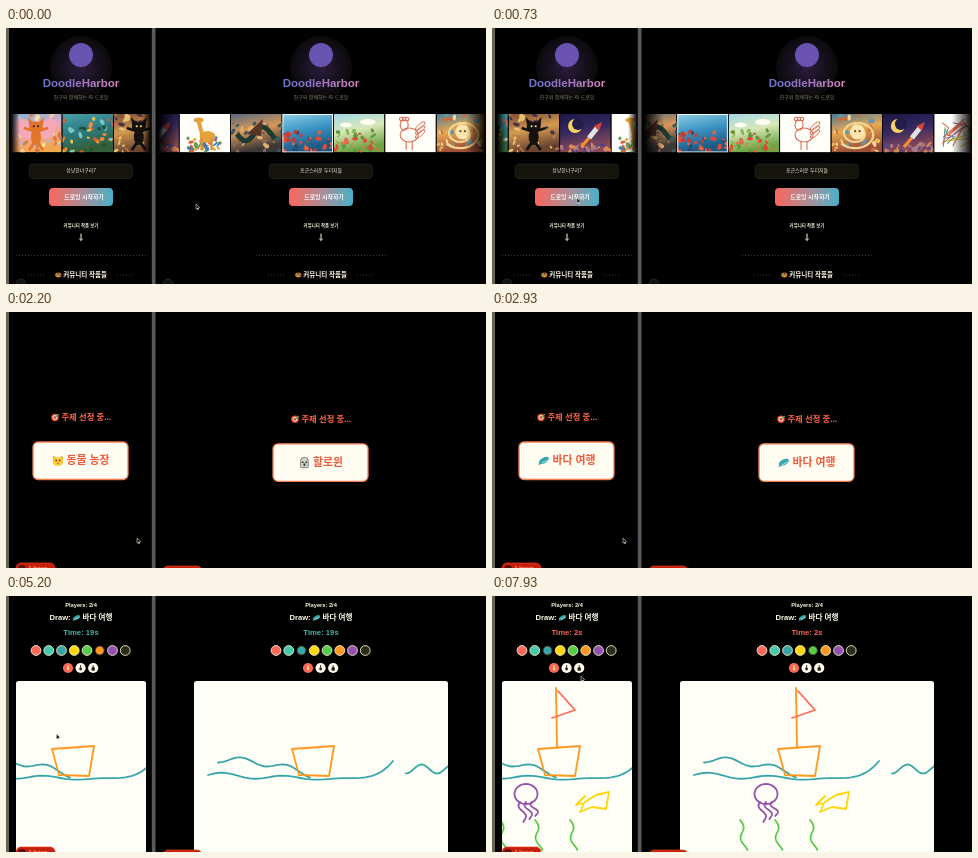
An HTML page with a canvas for the animation above (8000 ms loop, 480x256 px).

```html
<!DOCTYPE html>
<html lang="ko">
<head>
<meta charset="utf-8">
<title>DoodleHarbor</title>
<style>
  html, body { margin: 0; width: 100%; height: 100%; overflow: hidden; background: #000; }
  canvas { display: block; width: 100vw; height: 100vh; }
</style>
</head>
<body>
<canvas id="stage"></canvas>
<script>
const LOOP = 8000, STEP = 1000 / 15, W = 480, H = 256;
const JOIN = [800, 1470], PICK = 2030, SETTLE = 2930, GAME = 3345;
const NAMES = ['상냥한너구리7', '포근스러운 두더지들'];
const [RED, MINT, TEAL, YELLOW, GREEN, ORANGE, PURPLE, DARK] = [0, 1, 2, 3, 4, 5, 6, 7];
const PALETTE = ['#ff6b58', '#48c9a9', '#38a6a8', '#ffd60a', '#58cc48', '#ff981f', '#9350ad', '#2b2d16'];
const TOPICS = [['cat', '동물 농장'], ['ghost', '할로윈'], ['dolphin', '바다 여행']];
const PANELS = [{ id: 0, x: 4, w: 141, dx: 0 }, { id: 1, x: 150, w: 330, dx: 240 }];
const FONT = '"Liberation Sans", "Noto Sans CJK KR", "Noto Sans CJK", sans-serif';
const { sin, cos, PI } = Math;

const canvas = document.getElementById('stage');
const c = canvas.getContext('2d');

// ---- drawing helpers ----
function shape(fill, stroke, width = 1) {
  if (fill) { c.fillStyle = fill; c.fill(); }
  if (stroke) { c.strokeStyle = stroke; c.lineWidth = width; c.stroke(); }
}
function rect(x, y, w, h, fill) { c.fillStyle = fill; c.fillRect(x, y, w, h); }
function round(x, y, w, h, r, fill, stroke, width) {
  c.beginPath(); c.roundRect(x, y, w, h, r); shape(fill, stroke, width);
}
function oval(x, y, rx, ry, fill, stroke, width, turn = 0) {
  c.beginPath(); c.ellipse(x, y, rx, ry, turn, 0, 7); shape(fill, stroke, width);
}
function dot(x, y, r, fill, stroke, width) { oval(x, y, r, r, fill, stroke, width); }
function poly(points, fill, stroke, width) {
  c.beginPath();
  points.forEach(([x, y]) => c.lineTo(x, y));
  if (fill) c.closePath();
  shape(fill, stroke, width);
}
function line(x0, y0, x1, y1, color, width) { poly([[x0, y0], [x1, y1]], null, color, width); }
function dashed(x0, x1, y, color) {
  c.setLineDash([1, 2]); line(x0, y, x1, y, color, 0.8); c.setLineDash([]);
}
function blend(x0, y0, x1, y1, ...colors) {
  const g = c.createLinearGradient(x0, y0, x1, y1);
  colors.forEach((color, i) => g.addColorStop(i / (colors.length - 1), color));
  return g;
}
function glow(x, y, r, ...colors) {
  const g = c.createRadialGradient(x, y, 0, x, y, r);
  colors.forEach((color, i) => g.addColorStop(i / (colors.length - 1), color));
  dot(x, y, r, g);
}
function text(s, x, y, size, color, weight = 400, align = 'center') {
  c.font = `${weight} ${size}px ${FONT}`;
  c.textAlign = align; c.textBaseline = 'middle'; c.fillStyle = color;
  c.fillText(s, x, y);
}
function moved(x, y, scale, draw) {
  c.save(); c.translate(x, y); c.scale(scale, scale); draw(); c.restore();
}
function sample(fn, n = 40) { return Array.from({ length: n + 1 }, (_, i) => fn(i / n)); }
function random(seed) {
  return () => {
    seed = (seed * 16807) % 2147483647;
    return seed / 2147483647;
  };
}

// ---- icons in a 10 x 10 box around the origin ----
function eyes(color) { dot(-1.6, -0.6, 0.8, color); dot(1.6, -0.6, 0.8, color); }
const ICONS = {
  target() {
    ['#e8452c', '#f6d9c8', '#d8321f'].forEach((color, i) => dot(0, 0, 4.5 - i * 1.5, color));
    line(0, 0, 4.5, -4, '#48b070', 1.6);
  },
  cat() {
    for (const side of [-1, 1]) poly([[side * 4.5, -5], [side, -3], [side * 4.5, 0]], '#f2b62a');
    oval(0, 0.5, 4.8, 4, '#ffc93a'); eyes('#4a3510'); dot(0, 2, 0.8, '#d96b50');
  },
  ghost() {
    round(-3.5, -5, 7, 9.5, [4, 4, 1, 1], '#d5d7ce', '#6d7068', 0.8);
    eyes('#30332e'); oval(0, 1.8, 1, 1.3, '#30332e');
  },
  dolphin() {
    oval(0, -0.5, 5, 2.6, '#36a8b0', null, 0, -0.5);
    poly([[-4, 0], [-5, 4], [-1, 2]], '#36a8b0'); line(-2, 2, 4, -1, '#b8ecdf', 0.8);
  },
  palette() {
    oval(0, 0, 4.8, 3.8, '#c77a35');
    ['#ee4b36', '#f5d13c', '#4fb06a', '#301a08'].forEach((color, i) => dot(2.4 * cos(i * 1.6), 2 * sin(i * 1.6), 1, color));
  }
};
function iconText(before, kind, after, x, y, size, color) {
  c.font = `700 ${size}px ${FONT}`;
  const gap = size * 0.28, pre = c.measureText(before).width, post = c.measureText(after).width;
  const start = x - (pre + size + gap + post) / 2;
  text(before, start, y, size, color, 700, 'left');
  moved(start + pre + size / 2, y, size / 10, ICONS[kind]);
  text(after, start + pre + size + gap, y, size, color, 700, 'left');
}

// ---- gallery cards: a sky, seeded dabs below a height, one subject ----
const CARD_W = 50.6, CARD_H = 38.5, PITCH = 51.4;
const creature = (body, wing, eye) => () => {
  for (const side of [-1, 1]) {
    if (wing) oval(25 + side * 12, 15, 7, 11, wing, null, 0, side * 0.5);
    poly([[25 + side * 8, 3], [25 + side, 10], [25 + side * 6, 15]], body);
    line(25, 18, 25 + side * 12, 14, body, 2.4);
    line(25, 26, 25 + side * 7, 36, body, 3);
  }
  oval(25, 23, 5, 8, body); oval(25, 13, 7, 5.5, body);
  moved(25, 13, 1.3, () => eyes(eye));
};
const rocket = {
  sky: ['#1c1846', '#35295f', '#8a4a58'], dabs: ['#a8798a', '#5a4478', '#d98a50'], top: 30,
  subject() {
    dot(15, 12, 7, '#f6d264'); dot(18, 10, 6, '#231d4c');
    line(21, 33, 29, 24, '#ff8a2c', 3); line(29, 24, 37, 14, '#dfe3e6', 5);
    poly([[34, 12], [42, 8], [39, 17]], '#d84535');
  }
};
const CARDS = [
  { sky: ['#7fb4dc', '#eea6b4', '#f0a850'], dabs: ['#f6c9a0', '#d87a50', '#a7b8e8', '#f4e0a0'], top: 0,
    subject: creature('#e2752a', '#f4a8b8', '#2c1808') },
  { sky: ['#4aa0a8', '#2c7c84', '#345f38'], dabs: ['#ed8a32', '#e9c64b', '#7cc4c0', '#244c34', '#d65b36'], top: 4 },
  { sky: ['#7c4c34', '#d29a50', '#6a4430'], dabs: ['#4a3048', '#b87a40', '#e8c070'], top: 0,
    subject: creature('#15110f', null, '#f5e27a') },
  rocket,
  { sky: ['#fffef8', '#fffef8'], dabs: ['#397fb3', '#e26043', '#6b9f55', '#e8a83a'], top: 24, inset: 8,
    subject() {
      line(19, 7, 24, 26, '#e4a13d', 4); oval(19, 6, 5, 2.6, '#e4a13d'); oval(28, 23, 8, 6, '#e4a13d');
      for (const x of [22, 32]) line(x, 24, x, 36, '#d4903a', 2.4);
    } },
  { sky: ['#586a80', '#d89858', '#3c3838'], dabs: ['#8a6a58', '#3c5a58', '#e0b070'], top: 8,
    subject() {
      poly(sample(u => [6 + 38 * u, 20 + 7 * sin(u * 7)]), null, '#1f3a30', 5);
      poly([[16, 20], [32, 5], [30, 22]], '#5a3428');
    } },
  { sky: ['#8fd0e8', '#3c94c4', '#1c5884'], dabs: ['#dd4b35', '#e8603b', '#28486c', '#c83b30'], top: 17, edge: '#f4f8f4' },
  { sky: ['#a4d8e8', '#d8e8b8', '#6fa344'], dabs: ['#dc4935', '#5d943d', '#8ab858', '#e86a4c'], top: 16,
    subject() { oval(34, 8, 8, 3, '#fffdf0'); oval(12, 11, 6, 2.4, '#fffdf0'); } },
  { sky: ['#fffef8', '#fffef8'], dabs: [], top: 0,
    subject() {
      const ink = '#dc6c58';
      oval(24, 21, 9, 7, null, ink, 1.1); oval(19, 11, 4, 5, null, ink, 1.1);
      for (let i = 0; i < 3; i++) {
        dot(16 + i * 3, 5, 1.7, null, ink, 1.1);
        oval(35, 12 + i * 4, 6, 2, null, ink, 1, -0.7);
      }
      for (const x of [21, 27]) line(x, 28, x, 36, ink, 1.1);
    } },
  { sky: ['#4c7c9c', '#e8a850', '#9c5038'], dabs: ['#f4d8a0', '#c86c38', '#6898a8', '#f0b858'], top: 0,
    subject() {
      poly(sample(u => [25 + 20 * u * cos(u * 15), 20 + 15 * u * sin(u * 15)], 60), null, '#f6d490', 2.2);
      dot(26, 18, 7.5, '#ffe6ac'); moved(26, 18, 1.4, () => eyes('#704325'));
    } },
  rocket,
  { sky: ['#fffef8', '#fffef8'], dabs: [], top: 0,
    subject() {
      const next = random(77);
      for (const color of ['#d8634c', '#e3bd3a', '#559d94', '#9865a2', '#d8634c']) {
        poly(sample(() => [8 + next() * 34, 5 + next() * 28], 4), null, color, 1.1);
      }
    } }
];
function paintCard({ sky, dabs, top, subject, inset = 0, edge }, seed) {
  const next = random(seed * 991 + 7);
  rect(0, 0, CARD_W, CARD_H, blend(0, 0, 8, CARD_H, ...sky));
  for (let i = 0; dabs.length && i < 34; i++) {
    const x = inset + next() * (CARD_W - 2 * inset), y = top + next() * (CARD_H - top);
    oval(x, y, 1 + next() * 2.6, 0.8 + next() * 1.6, dabs[i % dabs.length], null, 0, next() * 3);
  }
  if (subject) subject();
  if (edge) { c.strokeStyle = edge; c.lineWidth = 2; c.strokeRect(0, 0, CARD_W, CARD_H); }
}
function gallery(p, t) {
  const y = 86, span = PITCH * CARDS.length, start = p.id ? -32 : 5;
  const x0 = p.id ? 152 : 5, x1 = p.id ? 480 : 145, fade = p.id ? 20 : 9;
  c.save();
  c.beginPath(); c.rect(x0, y, x1 - x0, CARD_H); c.clip();
  CARDS.forEach((card, i) => {
    let x = start + i * PITCH - t * 0.1243;
    if (x < x0 - PITCH) x += span;
    if (x > x1) return;
    c.save(); c.translate(x, y);
    c.beginPath(); c.rect(0, 0, CARD_W, CARD_H); c.clip();
    paintCard(card, i + 1); c.restore();
  });
  rect(x0, y, fade, CARD_H, blend(x0, 0, x0 + fade, 0, '#000', '#0000'));
  rect(x1 - fade, y, fade, CARD_H, blend(x1 - fade, 0, x1, 0, '#0000', '#000'));
  c.restore();
}

// ---- screens ----
function gradientButton(y, label) {
  round(43, y, 64, 18, 4, blend(43, 0, 107, 0, '#fa665c', '#b08c94', '#48b0c8'));
  text(label, 78, y + 9, 5.9, '#fff', 700);
}
function home(p, t) {
  gallery(p, t);
  c.save(); c.translate(p.dx, 0);
  glow(75, 39, 31, '#2a1c40', '#191322', '#0b090c');
  dot(75, 27, 12, '#6953b0');
  text('DoodleHarbor', 75, 56, 11.5, blend(36, 0, 113, 0, '#6674d4', '#9a74c4', '#dc86c0'), 700);
  text('친구와 함께하는 AI 드로잉', 75, 70, 5, '#85836c');
  round(23, 136, 103.5, 14.5, 4, '#14130c', '#29271a', 0.7);
  text(NAMES[p.id], 75, 143, 4.9, '#f5f2de');
  gradientButton(160, '드로잉 시작하기');
  text('커뮤니티 작품 보기', 75, 198, 4.4, '#f4f1d5', 700);
  line(75, 205.5, 75, 212.5, '#f4f1d5', 1);
  poly([[73.2, 210.5], [75, 212.5], [76.8, 210.5]], null, '#f4f1d5', 0.9);
  dashed(10, 141, 227.5, '#4a4834');
  dashed(22, 39, 247, '#4a4834'); dashed(111, 128, 247, '#4a4834');
  iconText('', 'palette', '커뮤니티 작품들', 75, 247, 6.5, '#fffbe8');
  c.restore();
}
function seat(x, y, name) {
  if (!name) {
    dot(x, y, 18.5, '#0d0c05', '#3f3b1e', 0.9);
    for (const side of [-1, 1]) poly([[x - 3, y - 6 + side * 4], [x + 3, y - 6 + side * 4], [x, y - 6]], '#665b25');
    text('대기 중', x, y + 6, 4, '#59532c');
    return;
  }
  glow(x, y, 23, '#5a210f', '#5a210f', '#0000');
  dot(x, y, 18.5, '#260d08', '#f45a48', 1.3);
  dot(x, y - 7, 9, '#f9605a');
  moved(x, y - 7, 1.4, () => eyes('#ffe9d8'));
  poly(sample(u => [x - 3 + 6 * u, y - 5 + 1.6 * sin(PI * u)]), null, '#ffe9d8', 0.8);
  text(name, x, y + 9.5, 3.7, '#fff', 700);
  dot(x + 11.5, y - 12, 4, '#42b84a');
  poly([[x + 9.7, y - 12], [x + 11, y - 10.6], [x + 13.5, y - 13.4]], null, '#eaffda', 0.8);
}
function lobby(p, t) {
  const full = t >= JOIN[1];
  c.save(); c.translate(p.dx, 0);
  for (let i = 0; i < 4; i++) {
    seat(52 + 45.5 * (i % 2), 97 + 46 * (i >> 1), i === 0 || full ? NAMES[i] : '');
  }
  if (!full) {
    round(33, 172, 83.5, 13.5, 3, '#1d1a0b', '#2d2810', 0.6);
    text('1명 더 필요해요, 친구들을 초대해보세요!', 75, 178.5, 4.2, '#e9dfaa');
  }
  dashed(10, 141, 239.5, '#302e20');
  gradientButton(246.5, '초대하기');
  c.restore();
}
function topicPicker(p, t, frame) {
  const [kind, label] = TOPICS[t >= SETTLE ? 2 : (frame + p.id) % 3];
  c.save(); c.translate(p.dx, p.id * 1.8);
  iconText('', 'target', '주제 선정 중...', 75, 105.5, 8.3, '#ff6540');
  round(27, 130, 95, 37.5, 5, '#fffdf2', '#f47a4e', 1.3);
  iconText('', kind, label, 75, 149, 10.9, '#f0593c');
  c.restore();
}

// ---- shared drawing, in left panel coordinates ----
const waves = [
  sample(u => [-28 + 92 * u, 163.5 + 15 * u * u + 3 * cos(4 * PI * u)]),
  sample(u => [-38 + 185 * u, 179 - 3 * (1 - u) * sin(6 * PI * u) + 6 * u - 20 * u ** 12]),
  sample(u => [160 + 42 * u, 173 + 4.5 * cos(8.5 * u)])
];
const hull = [[46, 153], [53, 179], [83, 180], [88, 150], [46, 153]];
const mast = [[64, 92], [65, 152]];
const sail = [[66, 95], [83, 114], [60, 122]];
const weeds = [0, 1, 2].map(i => sample(u => [8 + 35 * i + 5 * u + 2.5 * sin(7.5 * u), 224 + 30 * u]));
const fish = [[93, 200], [84, 209], [92, 207], [88, 216], [100, 211], [114, 213], [117, 196], [104, 199], [93, 206]];
const octopus = [
  sample(u => [34 - 11.5 * cos(2 * PI * u), 198 - 10 * sin(2 * PI * u)]),
  ...[0, 1, 2].map(i => sample(u => [28 + 6 * i + 5 * u - 2.5 * sin(7 * u), 206 + (20 - 3 * i) * u]))
];
const SESSIONS = [
  [1, TEAL, 3800, 4780, waves],
  [0, ORANGE, 5030, 5400, [hull, mast]],
  [0, RED, 5560, 5700, [sail]],
  [1, GREEN, 5920, 6250, weeds],
  [0, YELLOW, 6470, 6950, [fish]],
  [0, PURPLE, 7160, 7700, octopus]
];
const picks = [[0, RED, 0], [1, RED, 0], ...SESSIONS.map(([author, swatch, from]) => [author, swatch, from - 90]), [0, TEAL, 7830]];
const strokes = SESSIONS.flatMap(([author, swatch, from, to, paths]) => {
  const slot = (to - from) / paths.length, gap = paths.length > 1 ? 0.12 : 0;
  return paths.map((points, i) => ({
    author, points, color: PALETTE[swatch], from: from + i * slot, to: from + (i + 1 - gap) * slot
  }));
});
function drawn({ points, from, to }, t) {
  const lengths = points.slice(1).map(([x, y], i) => Math.hypot(x - points[i][0], y - points[i][1]));
  let rest = lengths.reduce((a, b) => a + b) * Math.min(1, (t - from) / (to - from));
  const path = [points[0]];
  for (let i = 0; i < lengths.length && rest > 0; i++) {
    const u = Math.min(1, rest / lengths[i]);
    path.push(points[i].map((v, k) => v + (points[i + 1][k] - v) * u));
    rest -= lengths[i];
  }
  return path;
}
function tag(name, color, [x, y]) {
  c.font = `700 3.5px ${FONT}`;
  const w = c.measureText(name).width + 5;
  round(x - w / 2, y - 11.5, w, 7, 3.5, color);
  text(name, x, y - 8, 3.5, '#fffbe8', 700);
}
const swatchX = i => 30 + i * 12.75;

function game(p, t) {
  const left = Math.ceil(30 - (t - GAME) / 160);
  const chosen = picks.filter(([id, , from]) => id === p.id && from <= t).pop()[1];
  c.save(); c.translate(p.dx, 0);
  text('Players: 2/4', 75, 9, 5.7, '#fffbd8', 700);
  iconText('Draw: ', 'dolphin', '바다 여행', 75, 22, 7.6, '#fffbe8');
  text(`Time: ${left}s`, 75, 37.2, 7.7, left > 10 ? '#3fb8a4' : '#ff6245', 700);
  PALETTE.forEach((color, i) => {
    const on = i === chosen;
    dot(swatchX(i), 54.5, on ? 4.4 : 4.9, color, on ? '#4a3b28' : '#f0ecd0', 0.9);
  });
  for (let i = 0; i < 3; i++) {
    const x = 62 + i * 12.6, ink = i ? '#29261c' : '#fff0df';
    dot(x, 72, 5.1, i ? '#fffdf0' : '#fa6853');
    line(x, 69, x, 74, ink, 0.9); dot(x, 73, 0.9 + i * 0.5, ink);
  }
  const x = p.id ? -52 : 10, w = p.id ? 254 : 130;
  round(x, 85, w, 180, 2.5, '#fffff7');
  c.beginPath(); c.rect(x, 85, w, H - 85); c.clip();
  c.lineCap = c.lineJoin = 'round';
  for (const s of strokes.filter(s => t >= s.from)) {
    const path = drawn(s, t);
    poly(path, null, s.color, 1.8);
    if (t < s.to && s.author !== p.id) tag(NAMES[s.author], s.color, path.pop());
  }
  c.restore();
}
function badge(p, t) {
  const x = p.id ? 157 : 10, y = p.id ? 254 : 251;
  if (t < JOIN[p.id]) {
    dot(x + 5, 256, 5, '#111', '#33312a', 0.7);
    return;
  }
  round(x, y, 39, 12, 5, '#c81e0c', '#e83a20', 0.7);
  dot(x + 6, y + 6, 4, '#5a1008');
  text('1 Issue', x + 22, y + 5, 5.6, '#ff9c82', 700);
}

// ---- pointer: rests, colour picks and pen ends joined by eased moves ----
const stops = [
  [0, 190, 176], [120, 190, 176], [550, 85, 170], [780, 85, 170], [1200, 221, 176], [1440, 315, 169],
  [1850, 75, 251], [2200, 131, 226], [3300, 131, 226], [3930 + LOOP / 2, 89, 80], [LOOP, 89, 92],
  ...picks.slice(2).map(([id, swatch, time]) => [time, swatchX(swatch) + id * 240, 54]),
  ...strokes.flatMap(s => [s.from, s.to].map(time => {
    const [x, y] = drawn(s, time).pop();
    return [time, x + s.author * 240, y];
  }))
].sort((a, b) => a[0] - b[0]);

function pointer(t) {
  const pen = strokes.find(s => t >= s.from && t < s.to);
  let x, y;
  if (pen) {
    [x, y] = drawn(pen, t).pop();
    x += pen.author * 240;
  } else {
    const i = stops.findIndex(k => k[0] > t), a = stops[i - 1], b = stops[i];
    const u = (t - a[0]) / (b[0] - a[0]), e = u * u * (3 - 2 * u);
    x = a[1] + (b[1] - a[1]) * e; y = a[2] + (b[2] - a[2]) * e;
  }
  moved(x, y, 1, () => {
    line(1, 3, 2.4, 5.6, '#d8d5bd', 1.6);
    poly([[0, 0], [0, 5], [3.6, 3.5], [0, 0]], '#0b0b08', '#d8d5bd', 0.6);
  });
}

const began = performance.now();
function render() {
  const now = (performance.now() - began) % LOOP;
  const frame = Math.floor((now + 5) / STEP) % 120, t = frame * STEP;
  const ratio = devicePixelRatio || 1;
  const pw = Math.round(innerWidth * ratio), ph = Math.round(innerHeight * ratio);
  if (canvas.width !== pw || canvas.height !== ph) { canvas.width = pw; canvas.height = ph; }
  c.setTransform(pw / W, 0, 0, ph / H, 0, 0);
  rect(0, 0, W, H, '#000');
  for (const p of PANELS) {
    c.save();
    c.beginPath(); c.rect(p.x, 0, p.w, H); c.clip();
    if (t >= GAME) game(p, t);
    else if (t >= PICK) topicPicker(p, t, frame);
    else if (t >= JOIN[p.id]) lobby(p, t);
    else home(p, t);
    badge(p, t);
    c.restore();
  }
  rect(0, 0, 3, H, '#66644e');
  rect(145.8, 0, 3.7, H, '#5a5a5c');
  pointer(t);
  requestAnimationFrame(render);
}
render();
</script>
</body>
</html>
```
